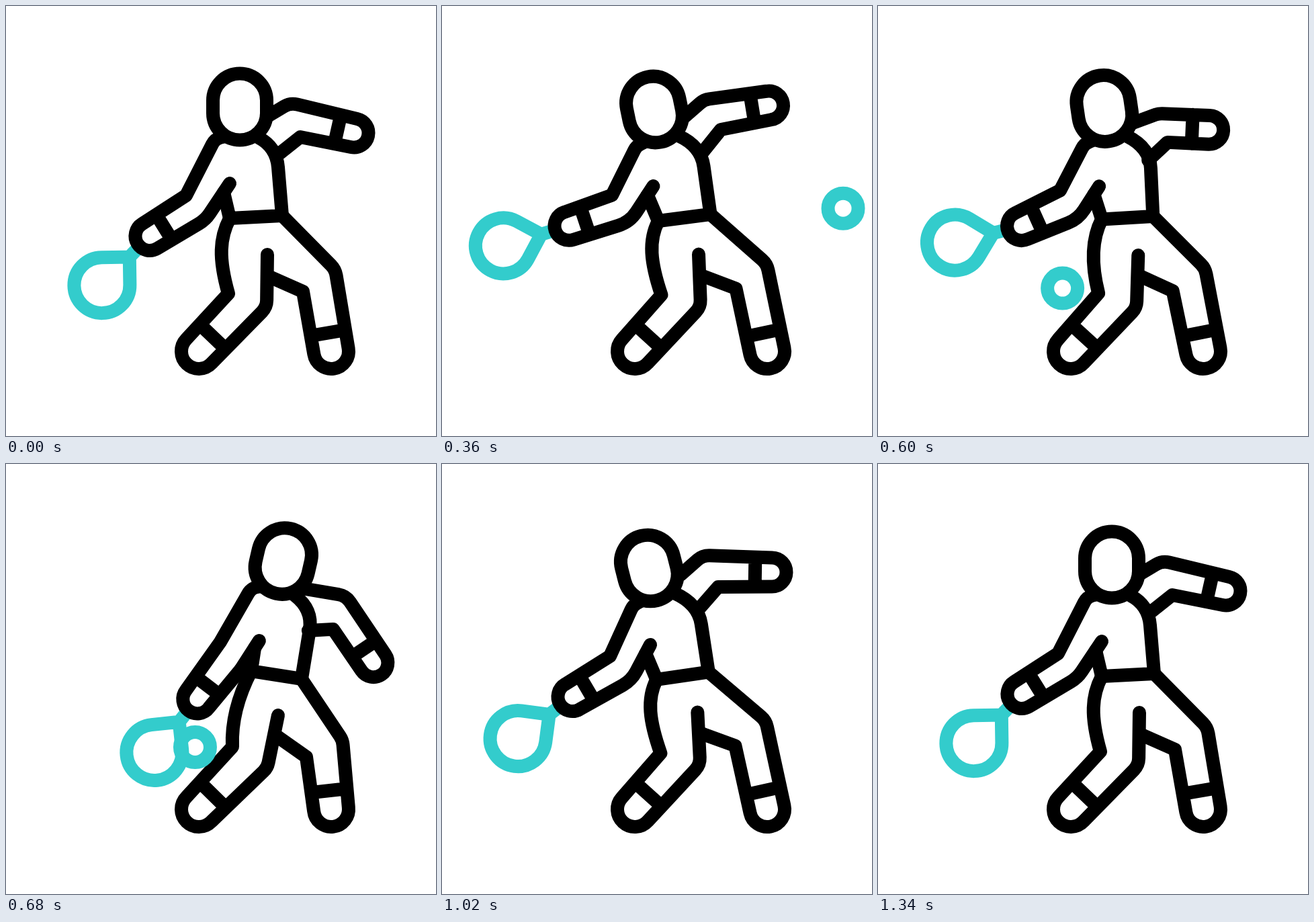
An HTML page with a canvas that plays this animation: 640 px wide and 640 px high, repeating every 1660 ms.

```html
<!DOCTYPE html>
<html lang="en">
<head>
<meta charset="utf-8">
<title>Racket swing</title>
<style>
  html, body { margin: 0; height: 100%; overflow: hidden; background: #fff; }
  canvas { display: block; width: 100vw; height: 100vh; }
</style>
</head>
<body>
<canvas id="stage" width="640" height="640"></canvas>
<script>
const ctx = document.getElementById('stage').getContext('2d');
const LOOP = 1660, STEP = 20, TEAL = '#33cccc';
const KEY_TIMES = [200, 520, 710, 1020, 1340];

const mix = (a, b, t) => a.map((v, i) => v + (b[i] - v) * t);
const smooth = u => u * u * (3 - 2 * u);
const progress = (t, from, to) => smooth(Math.min(1, Math.max(0, (t - from) / (to - from))));

// Joints in four poses: rest, backswing, hit, recovery.
// Where recovery is missing it lies between rest and backswing.
const joints = {
  head:       [[348, 150, 0], [284, 158, -23], [413, 144.5, 13]],
  chest:      [[405, 240], [374, 237], [452, 247]],
  waistL:     [[333, 316], [311, 324], [365, 308]],
  waistR:     [[411, 312], [388, 308], [440, 320]],
  armpit:     [[333, 264], [296, 272], [377, 263]],
  hip:        [[316, 375], [304, 387], [335, 375]],
  groin:      [[389, 370], [375, 369], [405, 374]],
  crotch:     [[390, 402], [382, 400], [403, 405]],
  frontKnee:  [[331, 428], [322, 432], [337, 421]],
  frontCalf:  [[388, 448], [382, 447], [389, 452]],
  backKnee:   [[442, 425], [433, 416], [447, 436]],
  backThigh:  [[490, 392], [477, 376], [501, 411]],
  elbow:      [[268, 282], [238, 281], [319, 265], [250, 286]],
  elbowIn:    [[297, 318], [262, 325], [350, 305], [282, 322]],
  hand:       [[214, 342.5], [164, 312], [285, 350], [194, 346.5]],
  backArm:    [[388, 165], [328, 170], [440, 185], [355, 165]],
  backElbow:  [[423, 144], [357, 135], [506, 196], [388, 136]],
  backElbowIn:[[438, 195], [392, 173], [487, 246], [411, 183]],
  backHand:   [[518, 189], [455, 107], [547, 296], [491, 161]],
  backArmpit: [[404, 222], [369, 217], [450, 248], [383, 215]],
  racket:     [[134.2], [192], [128.7], [142.5]]
};

for (const name in joints) {
  const [rest, back, hit, recover = mix(rest, back, 0.62)] = joints[name];
  joints[name] = [rest, back, mix(back, hit, 1.07), recover, rest];
}

function poseAt(t) {
  let i = 0;
  while (i < 3 && t >= KEY_TIMES[i + 1]) i++;
  const u = progress(t, KEY_TIMES[i], KEY_TIMES[i + 1]);
  const pose = {};
  for (const name in joints) pose[name] = mix(joints[name][i], joints[name][i + 1], u);
  return pose;
}

function begin(point) {
  ctx.beginPath();
  ctx.moveTo(...point);
}

// Continues the path round a hand or foot and back up the other side.
function limb(a, tip, b, end, r, bend, cuff) {
  const [x, y] = tip;
  const angle = Math.atan2(y - (a[1] + b[1]) / 2, x - (a[0] + b[0]) / 2);
  const c = Math.cos(angle), s = Math.sin(angle);
  ctx.lineTo(...a);
  ctx.arc(x, y, r, angle + Math.PI / 2, angle - Math.PI / 2, true);
  ctx.arcTo(...b, ...end, bend);
  ctx.lineTo(...end);
  ctx.moveTo(x - c * cuff - s * r, y - s * cuff + c * r);
  ctx.lineTo(x - c * cuff + s * r, y - s * cuff - c * r);
  ctx.stroke();
}

function drawRacket([x, y], degrees) {
  const r = 41.5, corner = r * Math.SQRT2;
  ctx.save();
  ctx.translate(x, y);
  ctx.rotate(degrees * Math.PI / 180);
  ctx.translate(102, 0);
  ctx.strokeStyle = TEAL;
  ctx.lineCap = 'butt';
  ctx.lineJoin = 'miter';
  ctx.beginPath();
  ctx.arc(0, 0, r, -Math.PI * 0.75, Math.PI * 0.75);
  ctx.lineTo(-corner, 0);
  ctx.closePath();
  ctx.moveTo(-corner, 0);
  ctx.lineTo(-82, 0);
  ctx.stroke();
  ctx.restore();
}

function drawFigure(p) {
  const [hx, hy, tilt] = p.head;
  const lean = tilt * Math.PI / 180, c = Math.cos(lean), s = Math.sin(lean);
  const fromHead = (x, y) => [hx + x * c - y * s, hy + x * s + y * c];

  // Legs
  begin(p.waistL);
  ctx.bezierCurveTo(p.waistL[0] - 15, p.waistL[1] + 29, ...p.hip, ...p.frontKnee);
  limb(p.frontKnee, [287, 514], p.frontCalf, p.groin, 26, 25, 30);
  begin(p.crotch);
  limb(p.backKnee, [484, 514], p.backThigh, p.waistR, 26, 28, 28);

  // Arms
  begin(p.backArmpit);
  limb(p.backElbowIn, p.backHand, p.backElbow, p.backArm, 21.5, 26, 25);
  begin(fromHead(-22, 44));
  ctx.arcTo(...fromHead(-37, 48), ...p.elbow, 20);
  limb(p.elbow, p.hand, p.elbowIn, p.armpit, 21.5, 50, 25);

  // Torso
  begin(fromHead(28, 46));
  ctx.quadraticCurveTo(...mix(p.waistR, p.chest, 1.42), ...p.chest);
  ctx.lineTo(...p.waistR);
  ctx.lineTo(...p.waistL);
  ctx.lineTo(...mix(p.armpit, p.elbowIn, 0.25));
  ctx.stroke();

  // Head
  ctx.save();
  ctx.translate(hx, hy);
  ctx.rotate(lean);
  ctx.beginPath();
  ctx.arc(0, -9.5, 40, Math.PI, 0);
  ctx.arc(0, 9.5, 40, 0, Math.PI);
  ctx.closePath();
  ctx.fill();
  ctx.stroke();
  ctx.restore();
}

function drawBall(t) {
  const hitTime = 654, hit = [256, 427];
  const [x, y] = t < hitTime
    ? mix([733, 251], hit, progress(t, 200, hitTime))
    : mix(hit, [735, 324], progress(t, hitTime, 840));
  ctx.strokeStyle = TEAL;
  ctx.beginPath();
  ctx.arc(x, y, 22.5, 0, Math.PI * 2);
  ctx.stroke();
}

function draw(now) {
  const t = Math.floor(now % LOOP / STEP) * STEP;
  const pose = poseAt(t);
  ctx.fillStyle = '#fff';
  ctx.fillRect(0, 0, 640, 640);
  ctx.lineWidth = 20;
  ctx.lineCap = ctx.lineJoin = 'round';
  drawRacket(pose.hand, pose.racket[0]);
  ctx.strokeStyle = '#000';
  drawFigure(pose);
  drawBall(t);
}

const start = performance.now();
function tick() {
  draw(performance.now() - start);
  requestAnimationFrame(tick);
}
tick();
</script>
</body>
</html>
```
